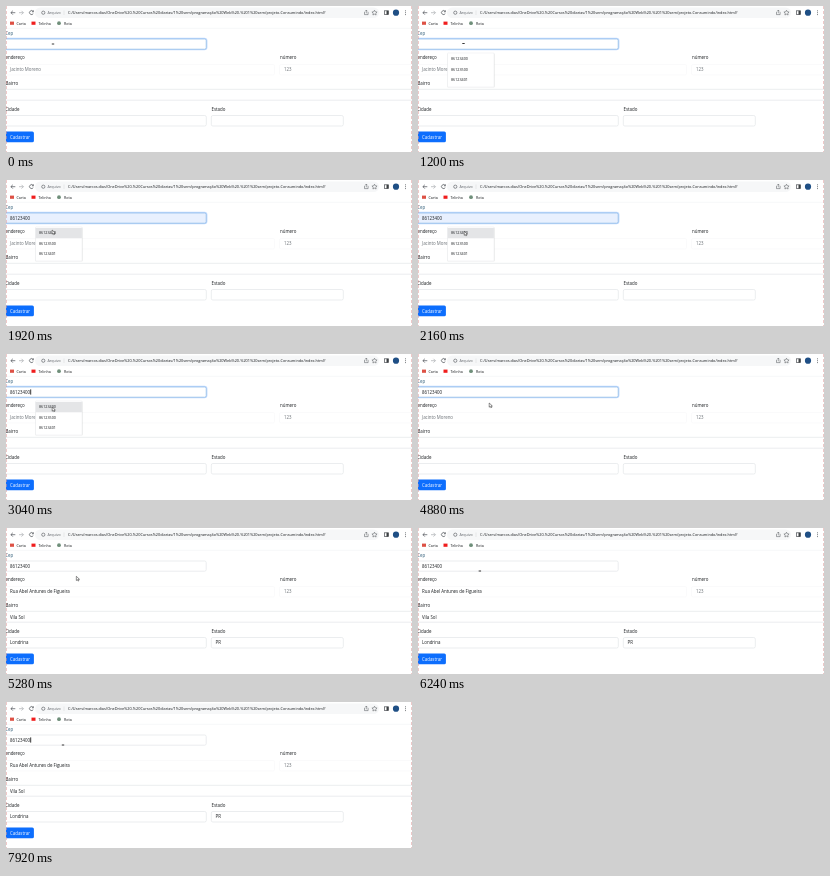
Write an HTML page that moves like this. It is 406x146 px and loops after 8000 ms.

```html
<!DOCTYPE html>
<html lang="pt">
<head>
<meta charset="utf-8">
<style>
html, body { margin: 0; width: 100%; height: 100%; overflow: hidden; background: #fff; }
svg { display: block; width: 406px; height: 146px; }
text { font: 500 4.4px "Open Sans", "Noto Sans", sans-serif; fill: #16191c; }
.small { font-size: 3.7px; }
.hint { fill: #666c72; }
.field { fill: #fff; stroke: #dde1e5; stroke-width: .6; }
.pale { stroke: #f6f7f8; }
.icon { fill: none; stroke: #4a4e53; stroke-width: .7; }
</style>
</head>
<body>
<svg viewBox="0 0 406 146">
  <!-- browser bar -->
  <rect x="29" y="1.5" width="344" height="10.5" rx="5.2" fill="#f6f7f8"/>
  <path class="icon" d="M9.3 6.7H4.9M6.8 4.8 4.9 6.7 6.8 8.6"/>
  <path class="icon" style="stroke:#aaadb0" d="M13 6.7h4.4M15.5 4.8 17.4 6.7 15.5 8.6"/>
  <path class="icon" d="M27.2 5.5a2 2 0 1 0 .1 2M27.4 4.3v1.5h-1.5"/>
  <circle class="icon" cx="37.3" cy="6.7" r="1.6" style="stroke-width:.6"/>
  <text class="small" x="41.5" y="8.1" style="fill:#5f6368">Arquivo</text>
  <path d="M58 4.5v4.5" stroke="#d4d7da" stroke-width=".5"/>
  <text x="62" y="8.1" style="font-size:3.83px">C:/Users/marcos.dias/OneDrive%20-%20Cursos%20diarias/1%20sem/programação%20Web%20-%201%20sem/projeto-Consumindo/index.html?</text>
  <path class="icon" d="M358.5 6v2.6h3.6V6M360.3 7.3V4.2M359 5.4l1.3-1.3 1.3 1.3" style="stroke-width:.5"/>
  <path class="icon" d="m368.5 4.2.8 1.6 1.8.2-1.3 1.2.3 1.8-1.6-.8-1.6.8.3-1.8-1.3-1.2 1.8-.2z" style="stroke-width:.5"/>
  <rect class="icon" x="378.6" y="4.8" width="3.8" height="3.8"/>
  <rect x="380.5" y="4.8" width="1.9" height="3.8" fill="#3c4043"/>
  <circle cx="390" cy="6.7" r="3.1" fill="#1f4f85"/>
  <path d="M399.5 4.8v3.8" stroke="#4a4e53" stroke-width=".9" stroke-linecap="round" stroke-dasharray="0 1.9"/>
  <!-- bookmarks -->
  <rect x="4" y="15.6" width="4" height="3.2" fill="#dd5145"/>
  <text class="small" x="10.5" y="18.6">Carta</text>
  <rect x="25.5" y="15.6" width="4" height="3.2" fill="#f01d1d"/>
  <text class="small" x="32.5" y="18.6">Telinha</text>
  <circle cx="53" cy="17.2" r="1.9" fill="#6f8f7a"/>
  <text class="small" x="58" y="18.6">Rota</text>
  <path d="M0 22.3h406" stroke="#eceef0" stroke-width=".5"/>
  <!-- form -->
  <text x="-.8" y="28.6" style="fill:#35607c">Cep</text>
  <rect id="ring" x="-3" y="32.3" width="203.8" height="11.4" rx="2.4" fill="none" stroke="#c3dbfe" stroke-width="1.3"/>
  <rect id="cep" class="field" x="-2" y="33" width="202.2" height="10.2" rx="1.6"/>
  <text id="code" x="4" y="39.8"></text>
  <path id="caret" d="M24.7 35.4v5.2" stroke="#000" stroke-width=".8"/>
  <text x="-.5" y="53.4">endereço</text>
  <text x="274" y="53.4">número</text>
  <rect class="field pale" x="-2" y="58.5" width="270.5" height="10.5" rx="1.6"/>
  <rect class="field pale" x="273.5" y="58.5" width="140" height="10.5" rx="1.6"/>
  <text id="street" x="4" y="65.3"></text>
  <text class="hint" x="278" y="65.3">123</text>
  <text x="-.5" y="78.9">Bairro</text>
  <rect class="field" x="-2" y="83.3" width="416" height="10.9" rx="1.6"/>
  <text id="area" x="4" y="90.8"></text>
  <text x="-.8" y="104.6">Cidade</text>
  <text x="205.5" y="104.6">Estado</text>
  <rect class="field" x="-2" y="109.5" width="202.3" height="10.5" rx="1.6"/>
  <rect class="field" x="205.3" y="109.5" width="132" height="10.5" rx="1.6"/>
  <text id="city" x="4" y="116.4"></text>
  <text id="state" x="209.5" y="116.4"></text>
  <rect x="-1" y="125.5" width="28.9" height="10.8" rx="1.6" fill="#0d6efd"/>
  <text x="4" y="132.5" style="fill:#fff">Cadastrar</text>
  <!-- suggestions -->
  <g id="list">
    <rect x="29" y="47.4" width="48" height="34.2" rx="1" fill="#000" opacity=".06"/>
    <rect x="29.5" y="47" width="46.6" height="34" rx=".8" fill="#fff" stroke="#e3e5e7" stroke-width=".4"/>
    <rect id="hover" x="29.7" y="48" width="46.2" height="10.3" fill="#e4e5e7"/>
    <text class="small" x="33" y="54.4">86123400</text>
    <text class="small" x="33" y="64.9">86123500</text>
    <text class="small" x="33" y="75.4">86123401</text>
  </g>
  <path d="M.4 0v146M405.6 0v146" stroke="#d99" stroke-width=".6" stroke-dasharray="3 2"/>
  <g id="mouse">
    <path id="beam" d="M-1.2 0H1.2" stroke="#222" stroke-width=".9"/>
    <path id="arrow" d="M-.8-2v4.2l1-.9.7 1.5.8-.4-.7-1.4h1.4z" fill="#fff" stroke="#222" stroke-width=".5"/>
  </g>
</svg>
<script>
const LOOP = 8000;
const OPEN = 900, HOVER = 1750, PICK = 2700, CLOSE = 3120, FILL = 5040, CARET = 7500;
// time, x, y
const path = [
  [0, 47, 38], [1200, 45.5, 37.5], [1500, 45.5, 38], [2000, 47, 53], [3040, 47, 55],
  [3400, 48, 55], [4700, 72, 51], [5100, 72, 51], [6100, 62, 43], [7000, 60, 43], [7800, 57, 43], [LOOP, 57, 43]
];
const $ = id => document.getElementById(id);
const show = (id, on) => $(id).style.display = on ? "" : "none";

function put(id, value, hint = false) {
  $(id).textContent = value;
  $(id).classList.toggle("hint", hint);
}

function mouseAt(t) {
  const i = path.findIndex(p => p[0] > t);
  const [t0, x0, y0] = path[i - 1], [t1, x1, y1] = path[i];
  const u = (t - t0) / (t1 - t0), k = u * u * (3 - 2 * u);
  return [x0 + (x1 - x0) * k, y0 + (y1 - y0) * k];
}

function draw(t) {
  const filled = t >= FILL, preview = t >= HOVER && t < PICK;
  show("ring", !filled);
  $("cep").style.stroke = filled ? "" : "#78aee0";
  $("cep").style.fill = preview ? "#e8f0fe" : "";
  put("code", t >= HOVER ? "86123400" : "");
  show("caret", (t >= PICK && t < 3300) || t >= CARET);
  show("list", t >= OPEN && t < CLOSE);
  show("hover", t >= HOVER);
  put("street", filled ? "Rua Abel Antunes de Figueira" : "Jacinto Moreno", !filled);
  put("area", filled ? "Vila Sol" : "");
  put("city", filled ? "Londrina" : "");
  put("state", filled ? "PR" : "");
  const [x, y] = mouseAt(t), inField = y < 44;
  $("mouse").setAttribute("transform", `translate(${x} ${y})`);
  show("beam", inField);
  show("arrow", !inField);
}

const start = performance.now();
function tick() {
  draw((performance.now() - start) % LOOP);
  requestAnimationFrame(tick);
}
tick();
</script>
</body>
</html>
```
